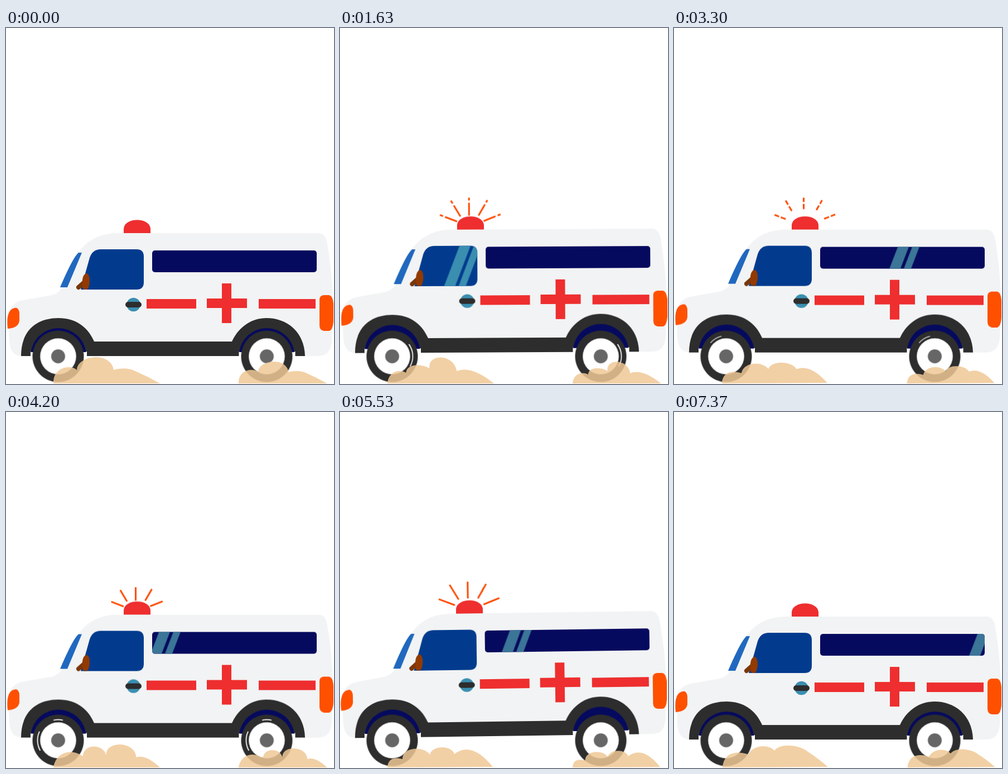
Animation of 588 by 637 pixels, one loop 7.41 s. Source, as an HTML page without scripts:

```html
<!DOCTYPE html>
<html lang="en">
<head>
<meta charset="utf-8">
<title>Ambulance</title>
<style>
  html, body { margin: 0; width: 100%; height: 100%; overflow: hidden; background: #fff; }
  svg { display: block; width: 100%; height: 100%; }

  .dark { fill: #2d2d2d; }
  .navy { fill: #060a5e; }
  .red { fill: #ee2e2f; }
  .lamp { fill: #ff5000; }

  .van { transform-origin: 280px 587px; animation: bounce 3.705s linear infinite; }
  .rays { fill: none; stroke: #ff4e08; stroke-width: 3.1; animation: rays 3.705s linear infinite; }
  .shine { animation: sweep 1.235s linear infinite; }
  .spin { transform-origin: 0 0; animation: spin 3.705s linear infinite; }
  .glint { fill: none; stroke: #fff; stroke-width: 1.8; animation: glint 3.705s linear infinite; }
  .dust { fill: #f0c896; fill-opacity: .85; animation: puff 1.235s linear 50ms infinite backwards; }

  @keyframes bounce {
    0% { transform: translateY(0) rotate(0deg); }
    13.4% { transform: translateY(-4.5px) rotate(0deg); }
    22% { transform: translateY(-3.5px) rotate(0deg); }
    32% { transform: translateY(-9px) rotate(.7deg); }
    44% { transform: translateY(-6.6px) rotate(-.27deg); }
    49.3% { transform: translateY(-7.1px) rotate(-.77deg); }
    57% { transform: translateY(-5px) rotate(-.4deg); }
    66.7% { transform: translateY(-4px) rotate(0deg); }
    72.7% { transform: translateY(-5.3px) rotate(0deg); }
    88% { transform: translateY(-7px) rotate(0deg); }
    98.9% { transform: translateY(-1px) rotate(0deg); }
    100% { transform: translateY(0) rotate(0deg); }
  }

  /* empty, skip, dash, gap, dash, gap, dash, rest */
  @keyframes rays {
    0%, 6% { stroke-dasharray: 0 0 0 0 0 0 0 60; }
    13.4% { stroke-dasharray: 0 0 24 0 0 0 0 60; }
    20%, 38% { stroke-dasharray: 0 0 33 0 0 0 0 60; }
    44% { stroke-dasharray: 0 0 23 4 6 0 0 60; }
    49.3% { stroke-dasharray: 0 2 31 0 0 0 0 60; }
    66.7% { stroke-dasharray: 0 7 26 0 0 0 0 60; }
    72.7% { stroke-dasharray: 0 0 6 4 11 4 8 60; }
    88% { stroke-dasharray: 0 8 11 4 10 0 0 60; }
    96%, 100% { stroke-dasharray: 0 33 0 0 0 0 0 60; }
  }

  @keyframes sweep {
    0% { transform: translateX(100px); }
    18.2% { transform: translateX(163px); }
    32% { transform: translateX(253px); }
    40.1% { transform: translateX(313px); }
    47.8% { transform: translateX(346px); }
    96.8% { transform: translateX(583px); }
    100% { transform: translateX(600px); }
  }

  @keyframes spin {
    0% { transform: rotate(560deg); }
    13.4% { transform: rotate(150deg); }
    44% { transform: rotate(-755deg); }
    66.7% { transform: rotate(-1592deg); }
    72.7% { transform: rotate(-1788deg); }
    100% { transform: rotate(-2640deg); }
  }

  @keyframes glint {
    0%, 5% { opacity: 0; stroke-dasharray: 20 20 10 400; }
    9% { opacity: 1; }
    13.4% { stroke-dasharray: 55 52 26 400; }
    44% { opacity: 1; stroke-dasharray: 65 0 0 400; }
    48%, 59% { opacity: 0; }
    63%, 74% { opacity: 1; }
    66.7% { stroke-dasharray: 43 0 0 400; }
    72.7% { stroke-dasharray: 20 0 0 400; }
    86% { opacity: 1; stroke-dasharray: 45 0 0 400; }
    95%, 100% { opacity: 0; stroke-dasharray: 20 0 0 400; }
  }

  @keyframes puff {
    0% { d: path("M85 636C84 605 118 602 127 612C128 585 188 578 193 612C203 608 222 608 232 614Q255 624 276 636"); }
    14.2% { d: path("M85 636C86 622 98 622 105 624C106 602 134 596 148 612C145 581 197 578 202 614Q226 602 276 636"); }
    27.9% { d: path("M85 636C88 610 112 612 118 617C120 598 150 602 160 609C156 582 204 582 209 614Q234 603 276 636"); }
    36% { d: path("M85 636C90 606 120 602 138 616C140 592 175 594 180 614C178 588 232 588 234 618Q250 612 276 636"); }
    43.7% { d: path("M85 636C86 618 100 618 112 621C112 599 150 597 161 613C165 596 200 596 205 612Q236 588 274 635"); }
    90%, 100% { d: path("M87 636C90 604 120 608 133 613C142 595 170 594 180 606C190 592 225 595 240 608Q256 618 276 635"); }
  }
</style>
</head>
<body>
<svg viewBox="0 0 588 637" preserveAspectRatio="none">
  <defs>
    <path id="screen" d="M136 402L110 464H97Q105 445 111 433Q123 408 130 402Z"/>
    <path id="door" d="M170 396H234Q247 396 247 409V455Q247 468 234 468H134L150 411Q155 396 170 396Z"/>
    <rect id="side" x="262" y="398" width="295" height="39" rx="5"/>
    <clipPath id="inScreen"><use href="#screen"/></clipPath>
    <clipPath id="inDoor"><use href="#door"/></clipPath>
    <clipPath id="inSide"><use href="#side"/></clipPath>
    <path id="bars" d="M2.7 390H-10.3L-43 475H-30ZM-16.3 390H-36L-69 475H-49Z"/>
    <g id="well">
      <rect x="-50" y="-8" width="101" height="9" fill="#fff"/>
      <path class="navy" d="M-49.500 -7A50 50 0 0 1 49.500 -7Z"/>
    </g>
    <g id="wheel">
      <circle class="dark" r="46"/>
      <circle r="32.3" fill="#fff"/>
      <circle r="12.5" fill="#666"/>
    </g>
  </defs>

  <g class="van">
    <path class="rays" d="M211 352.5L180 340.5M217 343.5L200 315M232.500 342V310M249.5 342L265.5 314.5M258.5 352L289 340"/>
    <path class="red" d="M211 368V360C211 338 259 338 259 360V368Z"/>
    <path fill="#f2f3f4" d="M200 367H560Q573 367 576 386Q585 440 586 490L584 560Q582 587 560 587H28Q8 587 6 560L4 512Q10 491 30 487L82 478Q96 474 102 462L121 418Q143 368 200 367Z"/>
    <path class="dark" d="M27 587C27 541 55 519 94 519C125 519 147 535 158 561H405C417 535 440 519 467 519C505 519 535 545 536 587Z"/>
    <use href="#well" x="94" y="587"/>
    <use href="#well" x="467.500" y="587"/>

    <use href="#screen" fill="#2068bf"/>
    <use href="#door" fill="#023b8e"/>
    <use href="#side" class="navy"/>
    <g clip-path="url(#inScreen)" fill="#429fc5"><use href="#bars" class="shine"/></g>
    <g clip-path="url(#inDoor)" fill="#3a8eb0"><use href="#bars" class="shine"/></g>
    <g clip-path="url(#inSide)" fill="#3b7597"><use href="#bars" class="shine"/></g>

    <path d="M130 464L139 456" stroke="#7a3608" stroke-width="8" stroke-linecap="round"/>
    <path fill="#923a00" d="M137 464Q135 440 145 439Q150 441 150 453Q149 468 143 468Q138 468 137 464Z"/>

    <circle cx="228.500" cy="495" r="12.200" fill="#3a8fb0"/>
    <rect class="dark" x="214" y="490" width="29" height="10" rx="5"/>
    <path class="red" d="M252 485H341V502H252ZM453 485H555V502H453ZM360 484H387V457H404V484H432V501H404V528H387V501H360Z"/>

    <path class="lamp" d="M3 538Q-1 502 18 500.500Q24 502 24 512V524Q22 537 3 538Z"/>
    <path class="lamp" d="M569 478H579Q586 479 587 494V524Q586 541 579 542H570Q562 541 562 532V486Q562 479 569 478Z"/>
  </g>

  <g transform="translate(93.500 587.500)">
    <use href="#wheel"/>
    <g class="spin"><circle class="glint" r="37" pathLength="360"/></g>
  </g>
  <g transform="translate(467.500 587.500)">
    <use href="#wheel"/>
    <g class="spin"><circle class="glint" r="37" pathLength="360"/></g>
  </g>

  <path class="dust" d="M85 636H276"/>
  <g transform="translate(417 636) scale(.83) translate(-85 -636)"><path class="dust" d="M85 636H276"/></g>
</svg>
</body>
</html>
```
